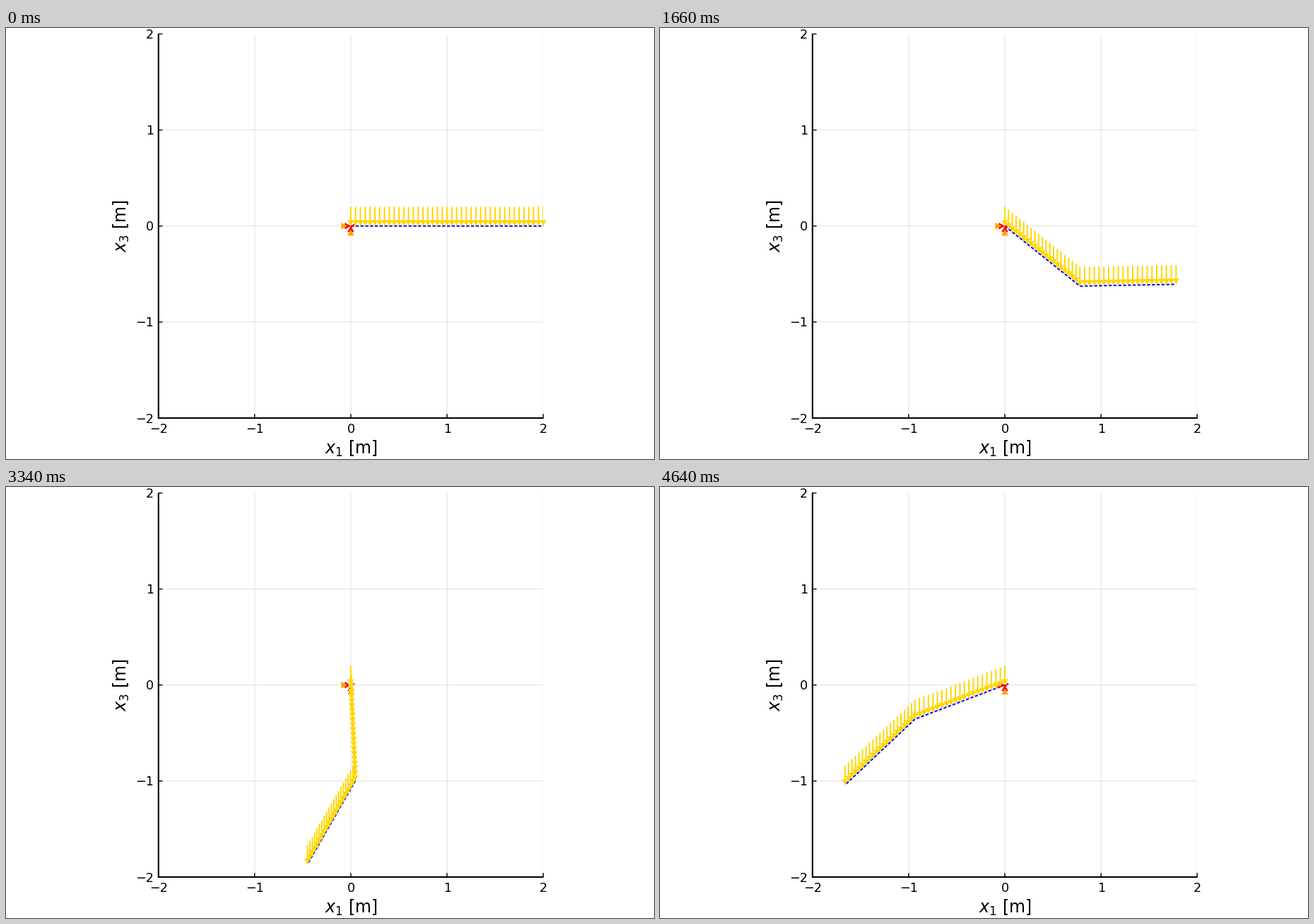
Write a matplotlib script that moves like this. It is 917 by 611 pixels and loops after 4.66 s.

```python
import numpy as np
import matplotlib.pyplot as plt
from matplotlib.animation import FuncAnimation
from matplotlib.collections import LineCollection, PolyCollection
from matplotlib.patches import Polygon, Rectangle

W, H, DPI = 917, 611, 100
PX = 72 / DPI                    # points per pixel
X0, Y0, UNIT = 488.0, 280.7, 136.1
LEFT, RIGHT = X0 - 2 * UNIT, X0 + 2 * UNIT
TOP, BOTTOM = Y0 - 2 * UNIT, Y0 + 2 * UNIT
GOLD, ORANGE = "#FFD700", "#FFA500"
G, STEP, POSES = 9.81, 0.01, 101
TICK_MS, LOOP_MS = 20, 4660
HEAD_LEN, HEAD_HALF, LOAD = 8.2, 4.6, 0.2 * UNIT


def rates(s):
    """Double pendulum of two uniform unit rods, angles from horizontal."""
    a, b, va, vb = s
    c, d = 0.5 * np.cos(a - b), 0.5 * np.sin(a - b)
    p = -1.5 * G * np.cos(a) - d * vb ** 2
    q = -0.5 * G * np.cos(b) + d * va ** 2
    det = 4 / 9 - c * c
    return np.array([va, vb, (p / 3 - c * q) / det, (4 / 3 * q - c * p) / det])


def simulate(substeps=5):
    s, h, out = np.zeros(4), STEP / substeps, []
    for _ in range(POSES):
        out.append(s[:2].copy())
        for _ in range(substeps):
            k1 = rates(s)
            k2 = rates(s + h / 2 * k1)
            k3 = rates(s + h / 2 * k2)
            k4 = rates(s + h * k3)
            s = s + h / 6 * (k1 + 2 * k2 + 2 * k3 + k4)
    return out


def pose_index(tick):
    """Two short holds and one long hold repeat every 140 ms."""
    cycle, rest = divmod((tick + 1) * TICK_MS, 140)
    return 3 * cycle + min(rest // TICK_MS, 2) - 1


def beam_points(a, b):
    r = np.linspace(0, 1, 21)[:, None] * UNIT
    first = np.array([X0, Y0]) + r * [np.cos(a), -np.sin(a)]
    second = first[-1] + r[1:] * [np.cos(b), -np.sin(b)]
    return np.vstack([first, second])


fig = plt.figure(figsize=(W / DPI, H / DPI), dpi=DPI, facecolor="white")
ax = fig.add_axes([0, 0, 1, 1])
ax.set_xlim(0, W)
ax.set_ylim(H, 0)
ax.axis("off")


def line(xs, ys, width, **style):
    return ax.plot(xs, ys, lw=width * PX, snap=False, **style)[0]


def triangle(tip, direction, color):
    d = np.array(direction)
    n = d[::-1]
    base = np.array(tip) - 8.6 * d
    ax.add_patch(Polygon([tip, base + 4.8 * n, base - 4.8 * n],
                         fc=color, ec="none", zorder=4))


area = Rectangle((LEFT, TOP), RIGHT - LEFT, BOTTOM - TOP, fc="none", ec="none")
ax.add_patch(area)

# Grid, ticks and axis lines
for v in range(-2, 3):
    x, y = X0 + v * UNIT, Y0 - v * UNIT
    for xs, ys in (((x, x), (TOP, BOTTOM)), ((LEFT, RIGHT), (y, y))):
        grid = line(xs, ys, 1.1, color="black", alpha=0.11, zorder=1)
        grid.set_clip_path(area)
    line((x, x), (BOTTOM, BOTTOM - 5), 1.4, color="black", zorder=2)
    line((LEFT, LEFT + 5), (y, y), 1.4, color="black", zorder=2)
    label = str(v).replace("-", "\u2212")
    font = dict(family="DejaVu Sans", size=17.6 * PX, color="black")
    ax.text(x + 0.3, 574.4, label, ha="center", va="baseline", **font)
    ax.text(209, y + 6.7, label, ha="right", va="baseline", **font)
line((LEFT, LEFT, RIGHT), (TOP, BOTTOM, BOTTOM), 2.1, color="black",
     solid_joinstyle="miter", solid_capstyle="butt", zorder=2)

guide = dict(family="DejaVu Sans", size=23.8 * PX, ha="center",
             va="baseline", rotation_mode="anchor")
ax.text(X0 + 0.5, 604.2, "$x_1$ [m]", **guide)
ax.text(171.2, Y0 - 0.5, "$x_3$ [m]", rotation=90, **guide)

# Pinned support
triangle((X0, Y0), (1, 0), "red")
triangle((X0, Y0), (0, -1), "red")
line((X0, X0 + 4), (Y0 + 2, Y0 - 1.5), 2.4, color="red", zorder=4)
triangle((X0 - 5, Y0), (1, 0), ORANGE)
triangle((X0, Y0 + 5), (0, -1), ORANGE)

# Moving beam and its distributed load
beam = line([], [], 2, color="blue", zorder=3, dashes=(2.2, 1.2),
            dash_capstyle="butt")
stems = LineCollection([], colors=GOLD, linewidths=2 * PX, zorder=5)
heads = PolyCollection([], facecolors=GOLD, edgecolors="none", zorder=6)
for part in (stems, heads):
    part.set_snap(False)
    ax.add_collection(part, autolim=False)
stems.set_clip_path(area)

poses = simulate()
head_shape = np.array([(0, 0), (-HEAD_HALF, -HEAD_LEN), (HEAD_HALF, -HEAD_LEN)])


def update(tick):
    pts = beam_points(*poses[pose_index(tick)])
    beam.set_data(pts[:, 0], pts[:, 1])
    stems.set_segments([[p - [0, LOAD], p - [0, HEAD_LEN / 2]] for p in pts])
    heads.set_verts([p + head_shape for p in pts])
    return beam, stems, heads


anim = FuncAnimation(fig, update, frames=LOOP_MS // TICK_MS,
                     interval=TICK_MS, repeat=True, repeat_delay=0)
plt.show()
```
